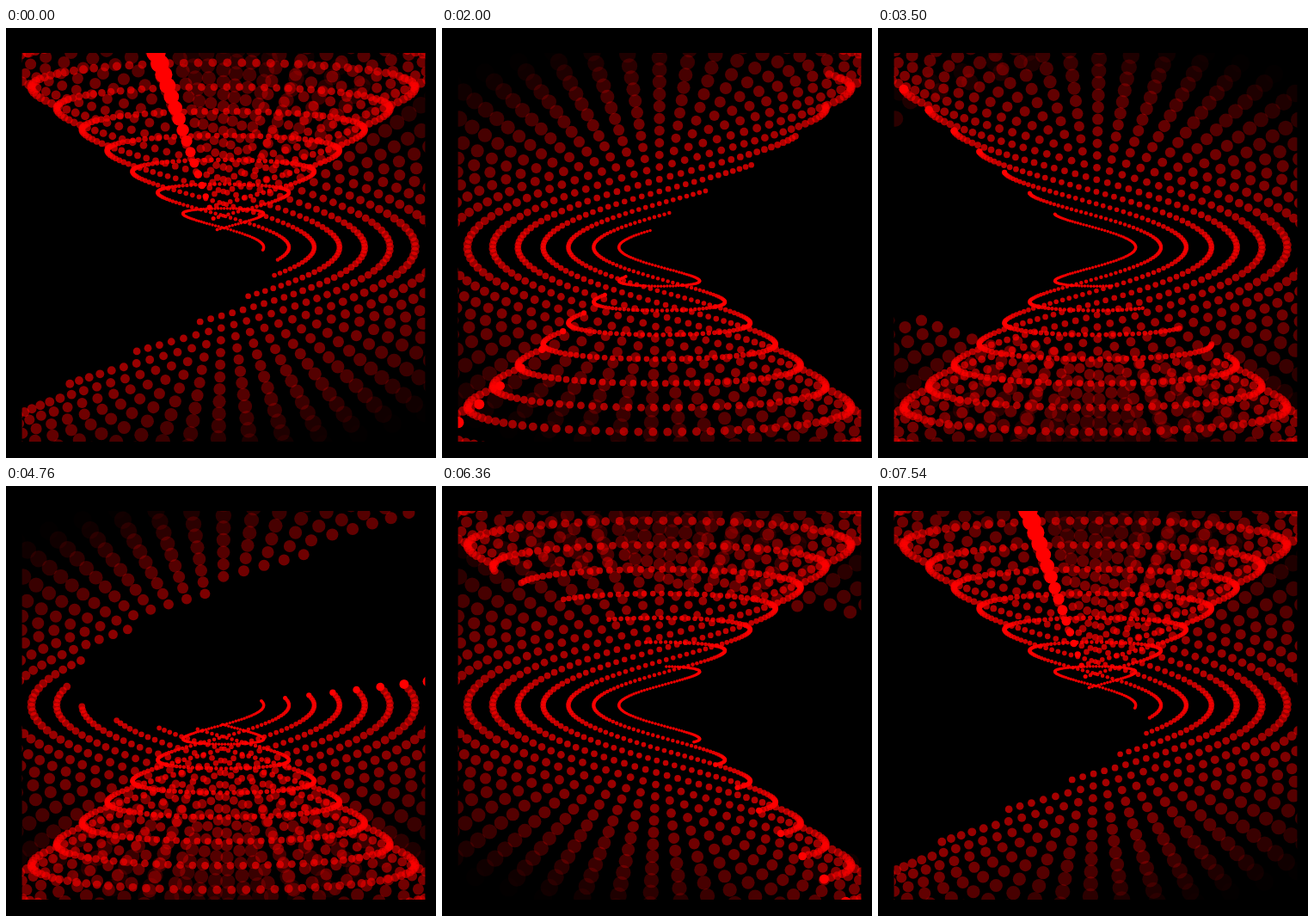
An HTML page with a canvas for the animation above (7560 ms loop, 500 by 500 pixels).

```html
<!DOCTYPE html>
<html lang="en">
<head>
<meta charset="utf-8">
<title>Red dot waves</title>
<style>
  html, body { margin: 0; width: 100%; height: 100%; overflow: hidden; background: #000; }
  canvas { display: block; width: 500px; height: 500px; }
</style>
</head>
<body>
<canvas id="stage" width="500" height="500"></canvas>
<script>
const ctx = document.getElementById('stage').getContext('2d');

const TICK = 20, TICKS = 378;
const VIEW = { x: 18.6, y: 29, w: 468.8, h: 452 };
const CENTER = { x: 252.7, y: 255 }, HALF = { x: 235, y: 226 };
const RINGS = 18;
const STEP = 1.4535;      // degrees between neighbouring dots
const START = 152.9;      // phase of the leading dot at rest
const TRAIL = 108;        // dots behind the leader on the inner ring
const TRAIL_GROWTH = 5;   // extra dots for each further ring
const LEADER_SIZE = 1.1;

const ringScale = n => 0.2 + 0.125 * n;
const dotRadius = n => 1.75 + 0.53 * n;
const ringAlpha = n => Math.max(0, 1 - ringScale(n) / 2.35);

// Leader position in dots: out and back, with a soft start; both end ticks rest.
function leaderAt(tick) {
  const t = Math.min(tick, TICKS - 1 - tick);
  const ease = 1 - Math.exp(-((t / 22) ** 1.5));
  return Math.round((0.996 * t + 9) * ease);
}

function drawDot(n, index, alpha, size = 1) {
  const phase = (START + index * STEP) * Math.PI / 180;
  const s = ringScale(n), r = dotRadius(n) * size;
  const x = CENTER.x + HALF.x * s * Math.cos(3 * phase);
  const y = CENTER.y - HALF.y * s * Math.sin(phase);
  if (x + r < VIEW.x || x - r > VIEW.x + VIEW.w) return;
  if (y + r < VIEW.y || y - r > VIEW.y + VIEW.h) return;
  ctx.globalAlpha = alpha;
  ctx.beginPath();
  ctx.arc(x, y, r, 0, 2 * Math.PI);
  ctx.fill();
}

function draw(tick) {
  const leader = leaderAt(tick);
  ctx.globalAlpha = 1;
  ctx.fillStyle = '#000';
  ctx.fillRect(0, 0, 500, 500);
  ctx.save();
  ctx.beginPath();
  ctx.rect(VIEW.x, VIEW.y, VIEW.w, VIEW.h);
  ctx.clip();
  ctx.fillStyle = '#f00';
  for (let n = RINGS - 1; n >= 0; n--) {
    const length = TRAIL + TRAIL_GROWTH * n;
    for (let i = leader - length; i < leader; i++) drawDot(n, i, ringAlpha(n));
  }
  for (let n = 0; n < RINGS; n++) drawDot(n, leader, 1, LEADER_SIZE);
  ctx.restore();
}

const begin = performance.now();
let shown = -1;
function loop() {
  const tick = Math.floor((performance.now() - begin) / TICK) % TICKS;
  if (tick !== shown) draw(shown = tick);
  requestAnimationFrame(loop);
}
loop();
</script>
</body>
</html>
```
